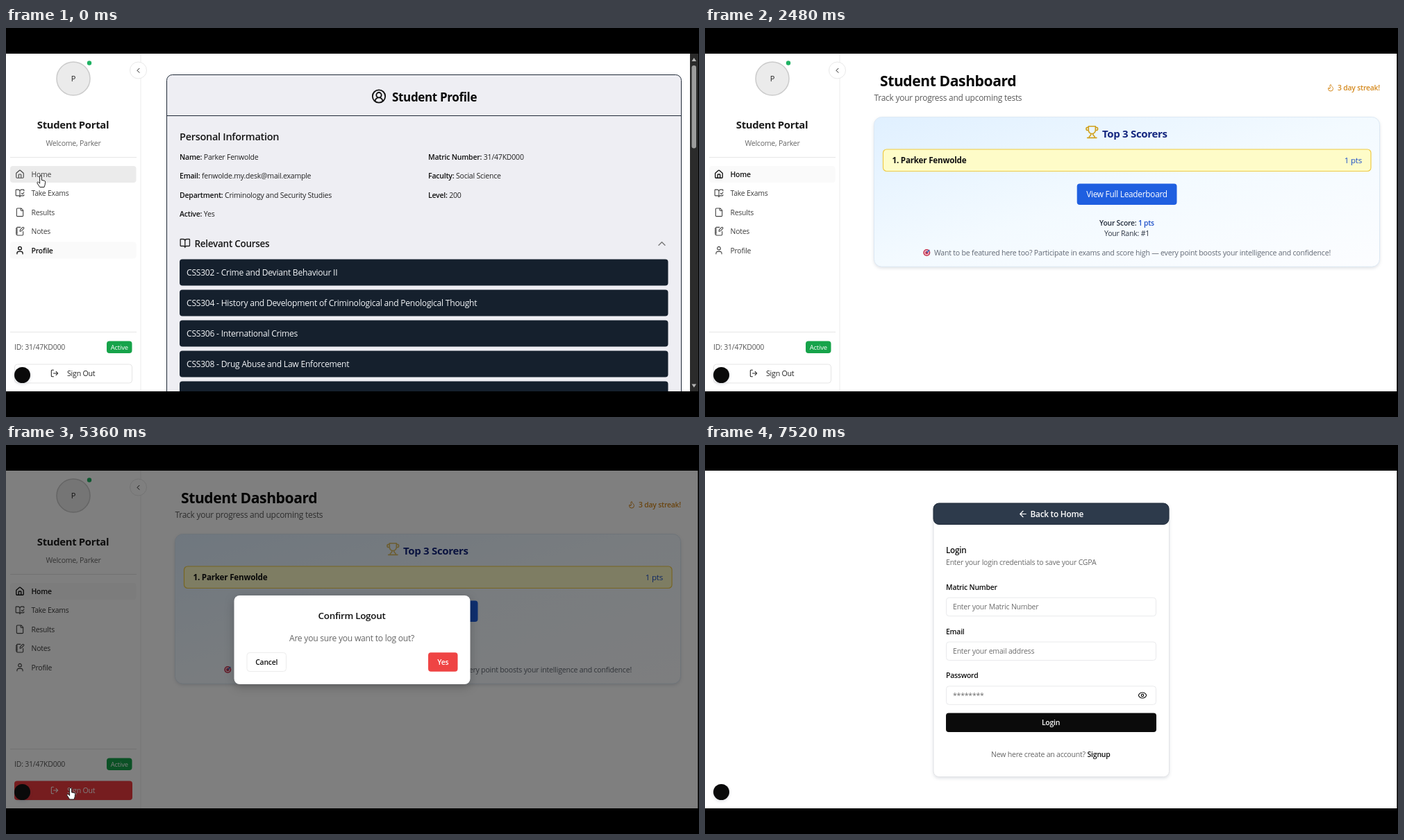
These frames come from a looping animation (998 px wide and 561 px high, 7640 ms). An HTML page:

```html
<!DOCTYPE html>
<html lang="en">
<head>
<meta charset="utf-8">
<title>Student portal</title>
<style>
  html, body { margin: 0; width: 100%; height: 100%; overflow: hidden; background: #000; }
  svg { display: block; width: 100%; height: 100%; }
  text { font-family: "Open Sans", "Noto Sans", sans-serif; letter-spacing: -.02em; white-space: pre; }
  .b { font-weight: 600; }
  .h { font-weight: 700; }
  .card { filter: drop-shadow(0 2px 2px rgba(20, 40, 70, .13)); }
  .modal { filter: drop-shadow(0 4px 7px rgba(0, 0, 0, .22)); }
</style>
</head>
<body>
<svg id="stage" viewBox="0 0 998 561"></svg>
<script>
const LOOP = 7640;
const USER = 'Parker Fenwolde', FIRST = 'Parker', MATRIC = '31/47KD000';

const ICONS = {
  home: 'M3 10a2 2 0 0 1 .7-1.5l7-6a2 2 0 0 1 2.6 0l7 6A2 2 0 0 1 21 10v9a2 2 0 0 1-2 2H5a2 2 0 0 1-2-2zM15 21v-8a1 1 0 0 0-1-1h-4a1 1 0 0 0-1 1v8',
  exams: 'M12 21V7M16 12l2 2 4-4M22 6V4a1 1 0 0 0-1-1h-5a4 4 0 0 0-4 4 4 4 0 0 0-4-4H3a1 1 0 0 0-1 1v13a1 1 0 0 0 1 1h6a3 3 0 0 1 3 3 3 3 0 0 1 3-3h6a1 1 0 0 0 1-1v-1.3',
  file: 'M15 2H6a2 2 0 0 0-2 2v16a2 2 0 0 0 2 2h12a2 2 0 0 0 2-2V7zM14 2v4a2 2 0 0 0 2 2h4',
  notes: 'M13.4 2H6a2 2 0 0 0-2 2v16a2 2 0 0 0 2 2h12a2 2 0 0 0 2-2v-7.4M2 6h4M2 10h4M2 14h4M2 18h4M21.4 5.6a1 1 0 1 0-3-3l-5 5a2 2 0 0 0-.5.9l-.9 2.9a.5.5 0 0 0 .6.6l2.9-.8a2 2 0 0 0 .9-.5z',
  user: 'M19 21v-2a4 4 0 0 0-4-4H9a4 4 0 0 0-4 4v2M8 7a4 4 0 1 0 8 0a4 4 0 1 0-8 0',
  userRound: 'M18 20a6 6 0 0 0-12 0M8 10a4 4 0 1 0 8 0a4 4 0 1 0-8 0M2 12a10 10 0 1 0 20 0a10 10 0 1 0-20 0',
  logout: 'M9 21H5a2 2 0 0 1-2-2V5a2 2 0 0 1 2-2h4M16 17l5-5-5-5M21 12H9',
  book: 'M12 7v14M3 18a1 1 0 0 1-1-1V4a1 1 0 0 1 1-1h5a4 4 0 0 1 4 4 4 4 0 0 1 4-4h5a1 1 0 0 1 1 1v13a1 1 0 0 1-1 1h-6a3 3 0 0 0-3 3 3 3 0 0 0-3-3z',
  trophy: 'M6 9H4.5a2.5 2.5 0 0 1 0-5H6M18 9h1.5a2.5 2.5 0 0 0 0-5H18M4 22h16M10 14.7V17c0 .5-.5 1-1 1.2C7.9 18.8 7 20.2 7 22M14 14.7V17c0 .5.5 1 1 1.2 1.1.6 2 2 2 3.8M18 2H6v7a6 6 0 0 0 12 0z',
  flame: 'M8.5 14.5A2.5 2.5 0 0 0 11 12c0-1.4-.5-2-1-3-1.1-2.1-.2-4.1 2-6 .5 2.5 2 4.9 4 6.5s3 3.5 3 5.5a7 7 0 1 1-14 0c0-1.2.4-2.3 1-3a2.5 2.5 0 0 0 2.5 2.5z',
  eye: 'M2 12.3a1 1 0 0 1 0-.6 10.8 10.8 0 0 1 20 0 1 1 0 0 1 0 .6 10.8 10.8 0 0 1-20 0M9 12a3 3 0 1 0 6 0a3 3 0 1 0-6 0',
  back: 'M12 19l-7-7 7-7M19 12H5',
  left: 'M15 18l-6-6 6-6',
  up: 'M18 15l-6-6-6 6'
};

const icon = (name, cx, cy, size, color, weight = 2) =>
  `<path d="${ICONS[name]}" transform="translate(${cx - size / 2} ${cy - size / 2}) scale(${size / 24})"
    fill="none" stroke="${color}" stroke-width="${weight}" stroke-linecap="round" stroke-linejoin="round"/>`;
const text = (x, y, size, str, fill = '#111', attrs = '') =>
  `<text x="${x}" y="${y}" font-size="${size}" fill="${fill}" ${attrs}>${str}</text>`;
const mid = (x, y, size, str, fill, attrs = '') => text(x, y, size, str, fill, `text-anchor="middle" ${attrs}`);
const rect = (x, y, w, h, r, fill, attrs = '') =>
  `<rect x="${x}" y="${y}" width="${w}" height="${h}" rx="${r}" fill="${fill}" ${attrs}/>`;
const circle = (x, y, r, fill, attrs = '') => `<circle cx="${x}" cy="${y}" r="${r}" fill="${fill}" ${attrs}/>`;
const line = (x1, y1, x2, y2, color) => `<path d="M${x1} ${y1}L${x2} ${y2}" stroke="${color}"/>`;
const group = (id, body, attrs = '') => `<g id="${id}" ${attrs}>${body}</g>`;
const page = (fill, attrs) => rect(0, 37, 996.2, 487, 0, fill, attrs);
const B = 'class="b"', H = 'class="h"';

function nav(active, hover) {
  const items = [['home', 'Home'], ['exams', 'Take Exams'], ['file', 'Results'], ['notes', 'Notes'], ['user', 'Profile']];
  return items.map(([name, label], i) => {
    const y = 211 + i * 27.4, on = i === active;
    const bg = i === hover ? '#ebebeb' : on ? '#fafafa' : 'none';
    return rect(6, y - 12, 181.5, 24, 4, bg) +
      icon(name, 20, y, 14, on ? '#111' : '#444', on ? 2.3 : 1.9) +
      text(36.5, y + 3.9, 10.4, label, on ? '#111' : '#3d3d3d', on ? B : '');
  }).join('');
}

const signOut = color => icon('logout', 70, 498, 12.5, color) + text(88, 502, 10.6, 'Sign Out', color, 'font-weight="500"');

const sidebar = () =>
  rect(0, 37, 194, 487, 0, '#fff') + line(194, 37, 194, 524, '#ececec') +
  circle(97, 73, 24, '#ebebeb', 'stroke="#cbcbcb" stroke-width="1.5"') +
  mid(97, 77.3, 11, 'P', '#222') + circle(120, 50.5, 3.2, '#1fb263') +
  circle(190.5, 61, 12, '#fff', 'stroke="#e9e9e9"') + icon('left', 190.5, 61.3, 12, '#222') +
  mid(96.5, 145, 14.8, 'Student Portal', '#1c1c1c', H) +
  mid(97, 170, 10.5, 'Welcome, ' + FIRST, '#666') +
  line(6, 186.5, 188, 186.5, '#e6e6e6') + line(6, 438.5, 188, 438.5, '#e6e6e6') +
  group('navProfile', nav(4, 0)) + group('navHome', nav(0, -1)) +
  text(12, 464, 10.5, 'ID: ' + MATRIC, '#555') +
  rect(145, 451.5, 36.5, 17.5, 4, '#16a34a') + mid(163.3, 464, 9.4, 'Active', '#fff', 'font-weight="500"') +
  rect(12.5, 485, 169, 27, 4, '#fff', 'stroke="#e5e5e5"') +
  group('signOut', signOut('#222')) +
  group('signHover', rect(12, 484.5, 170, 27.5, 4, '#ee3b3e') + signOut('#fff'));

function profile() {
  const field = (x, y, key, value) =>
    `<text x="${x}" y="${y}" font-size="10.5" fill="#222"><tspan ${B} fill="#111">${key}:</tspan> ${value}</text>`;
  const courses = ['CSS302 - Crime and Deviant Behaviour II',
    'CSS304 - History and Development of Criminological and Penological Thought',
    'CSS306 - International Crimes', 'CSS308 - Drug Abuse and Law Enforcement', ''];
  return rect(231.5, 67.5, 741, 480, 8, '#eeeef3', 'stroke="#1f2937"') + line(231.5, 126.5, 972.5, 126.5, '#1f2937') +
    icon('userRound', 537, 98.5, 22, '#111') + text(556, 106, 17, 'Student Profile', '#0a0a0a', H) +
    text(250, 161.5, 14.5, 'Personal Information', '#161616', B) +
    field(250, 190, 'Name', USER) + field(608, 190, 'Matric Number', MATRIC) +
    field(250, 217.3, 'Email', 'fenwolde.my.desk@mail.example') + field(608, 217.3, 'Faculty', 'Social Science') +
    field(250, 244.7, 'Department', 'Criminology and Security Studies') + field(608, 244.7, 'Level', '200') +
    field(250, 272, 'Active', 'Yes') +
    icon('book', 257.8, 310.5, 16, '#222') + text(271.5, 316, 13.5, 'Relevant Courses', '#161616', B) +
    icon('up', 944.5, 311, 18, '#777', 1.8) +
    courses.map((c, i) => rect(250, 333.5 + i * 44, 703.5, 38, 4, '#15202d') +
      text(260, 356.8 + i * 44, 12.1, c, '#f3f5f8')).join('') +
    rect(985, 37, 12, 487, 0, '#2b2b2b') + rect(987.5, 54, 6.5, 119.5, 3.2, '#9c9c9c') +
    '<path d="M987.5 48l3.3-5 3.3 5zM987.5 513.5l3.3 5 3.3-5z" fill="#b5b5b5"/>';
}

const target = circle(319.3, 307.3, 5, '#c9314f') + circle(319.3, 307.3, 3.4, '#f3d5dc') +
  circle(319.3, 307.3, 2.2, '#c9314f') + '<path d="M319.3 307.3l4-4" stroke="#2f6fc4" stroke-width="1.5"/>';

function home() {
  const score = n => `Your Score: <tspan fill="#1d4fc8">${n} pts</tspan>`;
  return text(252, 83.5, 21.1, 'Student Dashboard', '#080808', H) +
    text(243.5, 105.3, 11.95, 'Track your progress and upcoming tests', '#5b5b5b') +
    icon('flame', 901, 86, 12, '#d58a1f') + text(972, 89.8, 10.4, '3 day streak!', '#d58a1f', 'class="b" text-anchor="end"') +
    rect(243.5, 128.5, 728, 199, 11, 'url(#sky)', 'id="board" class="card" stroke="#dde9f4"') +
    group('trophy', icon('trophy', 557.3, 150, 20, '#cf9a0a', 1.9)) +
    text(572, 158, 15, 'Top 3 Scorers', '#14267f', H) +
    group('loading', text(256, 186, 10.45, 'Loading leaderboard...', '#5d6470') +
      mid(607.5, 268.3, 10.3, score(0), '#222b3a', B) + mid(607.5, 283.5, 10.5, 'Your Rank: Not ranked yet', '#2d3542')) +
    group('loaded', rect(256.5, 175, 702.5, 31.5, 5, '#fefcc8', 'stroke="#efcb45" stroke-width="1.2"') +
      text(269.5, 195.2, 11.7, '1. ' + USER, '#111', H) +
      text(946, 195.2, 11.6, '1 pts', '#1d4fc8', 'font-weight="500" text-anchor="end"') +
      mid(607.5, 285, 10.3, score(1), '#222b3a', B) + mid(607.5, 300.2, 10.5, 'Your Rank: #1', '#2d3542')) +
    group('lower', rect(535.7, 207.8, 143.8, 30.6, 4, '#1f5fe0') +
      mid(607.5, 227.8, 11.8, 'View Full Leaderboard', '#fff', 'font-weight="500"') + target +
      text(330, 311, 10.57, 'Want to be featured here too? Participate in exams and score high — every point boosts your intelligence and confidence!', '#626873'));
}

const modal = () => page('#000', 'opacity=".5"') +
  rect(328.5, 217, 340, 128, 8, '#fff', 'class="modal"') +
  mid(498, 251, 13.4, 'Confirm Logout', '#111', B) +
  mid(498, 282.5, 12.1, 'Are you sure you want to log out?', '#666') +
  rect(347, 299.5, 56.5, 27, 4, '#fff', 'stroke="#ececec"') + mid(375.2, 317, 10.4, 'Cancel', '#111', B) +
  group('yes', rect(608, 299.3, 42.5, 27.4, 4, '#ef4444') + mid(629.3, 317, 10.4, 'Yes', '#fff', B)) +
  group('busy', rect(608, 299.3, 42.5, 27.4, 4, '#f9a1a3') +
    '<path id="spin" d="M5 0A5 5 0 1 1 1.5-4.8" fill="none" stroke="#fff" stroke-width="1.3" stroke-linecap="round"/>');

function login() {
  const input = (y, label, hint) => text(347, y, 10.4, label, '#111', B) +
    rect(347.5, y + 11.5, 302, 26.5, 4, '#fff', 'stroke="#e9eaec"') + text(357, y + 28.5, 10.5, hint, '#6d6d6d');
  return page('#fff') +
    rect(329, 84, 339.5, 394.5, 8, '#fff', 'class="card" stroke="#e2e3e6"') +
    rect(329, 84, 339, 30.5, 8, '#2d3a4b', 'stroke="#202c3b"') +
    icon('back', 458, 99.5, 14.5, '#fff') + text(468.5, 104, 11.8, 'Back to Home', '#fff', B) +
    text(347, 155.7, 11.7, 'Login', '#111', B) +
    text(347, 173.3, 10.5, 'Enter your login credentials to save your CGPA', '#6a6a6a') +
    input(208.7, 'Matric Number', 'Enter your Matric Number') +
    input(272.5, 'Email', 'Enter your email address') + input(336.3, 'Password', '********') +
    icon('eye', 630, 361, 13.5, '#111') +
    rect(347, 386.5, 303, 27.5, 4, '#0b0b0b') + mid(498, 404, 10.4, 'Login', '#fff', B) +
    text(412, 450, 10.55, 'New here create an account?', '#666') + text(550.5, 450, 10.5, 'Signup', '#111', B);
}

document.getElementById('stage').innerHTML =
  `<defs><linearGradient id="sky" x1="0" y1="0" x2="1" y2="1">
    <stop offset="0" stop-color="#e0f0ff"/><stop offset=".5" stop-color="#f3faff"/><stop offset="1" stop-color="#fcfdff"/>
  </linearGradient><clipPath id="page">${rect(0, 37, 997, 487, 0, '#000')}</clipPath></defs>` +
  rect(0, 0, 998, 561, 0, '#000') +
  group('view', page('#fff') + sidebar() + group('profile', profile()) + group('home', home()) +
    group('modal', modal()) + group('login', login()) +
    circle(23.5, 500.5, 11.5, '#0a0a0a', 'class="card"') +
    group('arrow', '<path d="M0 0V11.4L2.7 9l1.8 4 1.8-.8L4.6 8.3H8.2z" fill="#fff" stroke="#222" stroke-width=".9" stroke-linejoin="round"/>') +
    group('hand', '<path d="M-1.4 1.4a1.4 1.4 0 0 1 2.8 0V6.4l3.8.8q1.6.4 1.4 2l-.5 4-1.1 3.3H-1.3L-4.9 11q-.8-1.4.4-1.8 1.2-.2 2 .8l1.1 1.2z" fill="#fff" stroke="#222" stroke-linejoin="round"/>'),
    'clip-path="url(#page)"');

const el = {};
document.querySelectorAll('[id]').forEach(n => el[n.id] = n);
const show = (id, on) => el[id].style.display = on ? '' : 'none';
const move = (id, x, y) => el[id].setAttribute('transform', `translate(${x} ${y})`);
const ramp = (t, a, b) => Math.max(0, Math.min(1, (t - a) / (b - a)));

// Pointer trips: [time, x, y] stops, eased between
const TRIPS = [
  [[0, 50, 213], [40, 50, 213], [360, 425, 209], [560, 1000, 190]],
  [[3040, 240, 360], [3160, 93, 494.5], [5380, 93, 494.5], [5800, 627, 311], [6020, 627, 311], [6320, 381, 117], [6480, 290, 20]]
];

function pointer(t) {
  for (const stops of TRIPS)
    for (let i = 1; i < stops.length; i++) {
      const [a, x0, y0] = stops[i - 1], [b, x1, y1] = stops[i];
      if (t < a || t >= b) continue;
      const p = ramp(t, a, b), k = p * p * (3 - 2 * p);
      return [x0 + (x1 - x0) * k, y0 + (y1 - y0) * k];
    }
  return null;
}

function draw(t) {
  const onHome = t >= 200, loaded = t >= 2120;
  const busy = t >= 6040 && t < 7160;
  show('navProfile', !onHome); show('profile', !onHome);
  show('navHome', onHome); show('home', onHome);
  show('loading', !loaded); show('loaded', loaded);
  move('lower', 0, loaded ? 16.7 : 0);
  el.board.setAttribute('height', loaded ? 215.7 : 199);
  el.trophy.setAttribute('opacity', .75 - .25 * Math.cos((t - 660) / 1126 * 2 * Math.PI));

  el.signHover.setAttribute('opacity', ramp(t, 3130, 3270) * (1 - ramp(t, 5380, 5460)));
  el.signOut.setAttribute('opacity', busy ? .5 : 1);
  show('modal', t >= 5360);
  show('yes', !busy); show('busy', busy);
  el.spin.setAttribute('transform', `translate(626 313) rotate(${170 + (t - 6320) * 360 / 570})`);
  show('login', t >= 7520);

  const pos = pointer(t);
  const hand = t < 60 || (t >= 3130 && t < 5380) || (t >= 5770 && t < 6040);
  show('hand', pos && hand); show('arrow', pos && !hand);
  if (pos) move(hand ? 'hand' : 'arrow', ...pos);
}

const start = performance.now();
function tick() {
  draw((performance.now() - start) % LOOP);
  requestAnimationFrame(tick);
}
draw(0);
requestAnimationFrame(tick);
</script>
</body>
</html>
```
